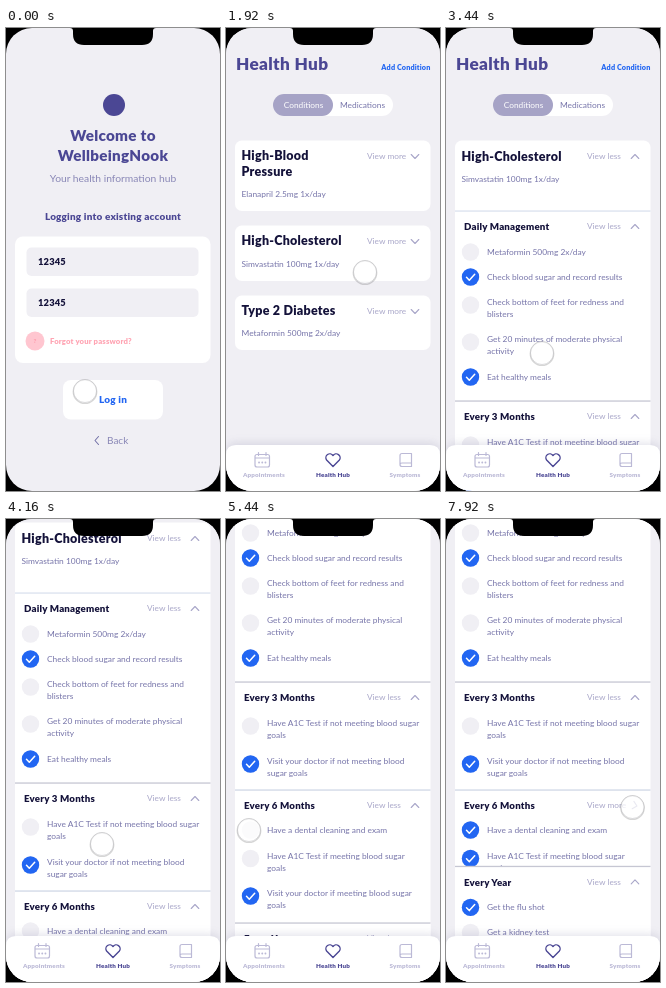
An HTML page that plays this animation: 214 px wide and 463 px high, repeating every 8 s.

```html
<!DOCTYPE html>
<html lang="en">
<head>
<meta charset="utf-8">
<title>Health app walkthrough</title>
<style>
  html, body { margin: 0; width: 100%; height: 100%; overflow: hidden; background: #000; }
  svg { display: block; width: 214px; height: 463px; border-radius: 26px; background: #f0eff4; }
  text { font-family: Lato, "Open Sans", sans-serif; }
  .heavy { font-weight: 900; letter-spacing: .02em; }
</style>
</head>
<body>
<svg id="stage" viewBox="0 0 214 463"></svg>
<script>
const LOOP = 8000, STEP = 80;
const INK = '#14123a', PURPLE = '#4b4794', BODY = '#7674a9', SOFT = '#a9a7c9',
      GREY = '#f0eff4', BLUE = '#2266f2';
const stage = document.getElementById('stage');

// ---- drawing helpers ----
function add(parent, tag, attrs = {}) {
  const node = document.createElementNS('http://www.w3.org/2000/svg', tag);
  for (const key in attrs) node.setAttribute(key, attrs[key]);
  return parent.appendChild(node);
}
const group = (parent, x = 0, y = 0) => add(parent, 'g', { transform: `translate(${x} ${y})` });
const box = (parent, x, y, width, height, rx, fill = '#fff') =>
  add(parent, 'rect', { x, y, width, height, rx, fill });
const line = (parent, d, stroke, width = 1.1) => add(parent, 'path', {
  d, stroke, 'stroke-width': width, fill: 'none', 'stroke-linecap': 'round', 'stroke-linejoin': 'round' });

// y is the middle of the capitals
function label(parent, x, y, string, size = 8.4, fill = BODY, anchor = 'start') {
  const node = add(parent, 'text', {
    x, y: y + size * 0.36, fill, 'font-size': size, 'text-anchor': anchor });
  node.textContent = string;
  return node;
}
function bold(parent, x, y, string, size, fill = INK, anchor) {
  label(parent, x, y, string, size, fill, anchor).setAttribute('class', 'heavy');
}

function viewToggle(parent, y, open) {
  const caption = label(parent, 141, y, open ? 'View less' : 'View more', 8.3, SOFT);
  const holder = group(parent, 189, y);
  const chevron = line(holder, 'M-3.8 2 L0 -2 L3.8 2', SOFT);
  if (!open) chevron.setAttribute('transform', 'rotate(180)');
  return { caption, chevron };
}

function tick(parent, y) {
  const mark = group(parent, 24.5, y);
  add(mark, 'circle', { r: 8.7, fill: BLUE });
  line(mark, 'M-4 0.3 L-1.2 3.2 L4.2 -2.8', '#fff', 1.5);
  return mark;
}

function task(parent, y, lines, checked) {
  const circleY = y + (lines.length > 1 ? 3 : 0);
  add(parent, 'circle', { cx: 24.5, cy: circleY, r: 8.7, fill: GREY });
  lines.forEach((string, i) => label(parent, 41, y + i * 12.3, string));
  const mark = tick(parent, circleY);
  mark.setAttribute('opacity', checked ? 1 : 0);
  return mark;
}

function section(parent, top, title, dividerColor) {
  box(parent, 9, top - 0.6, 195.5, 1.3, 0, dividerColor);
  bold(parent, 18, top + 16, title, 9.7);
  return viewToggle(parent, top + 15.5, true);
}

function hubHeader(parent) {
  bold(parent, 10, 36, 'Health Hub', 17.2, PURPLE);
  bold(parent, 204.5, 39.5, 'Add Condition', 7.25, BLUE, 'end');
  box(parent, 47, 66, 120, 22, 11);
  box(parent, 47, 66, 60, 22, 11, '#a6a3c6');
  label(parent, 77.5, 77, 'Conditions', 8.3, '#fff', 'middle');
  label(parent, 136.5, 77, 'Medications', 8.4, BODY, 'middle');
}

// ---- log-in screen ----
const login = group(stage);
add(login, 'circle', { cx: 108, cy: 77, r: 11, fill: PURPLE });
bold(login, 107, 108, 'Welcome to', 15.2, PURPLE, 'middle');
bold(login, 107, 127.5, 'WellbeingNook', 15.2, PURPLE, 'middle');
label(login, 107, 150, 'Your health information hub', 10.3, '#8987b6', 'middle');
bold(login, 107, 188.5, 'Logging into existing account', 9.95, PURPLE, 'middle');
box(login, 9, 208.5, 195.5, 126.5, 8);
for (const y of [219.5, 260.5]) {
  box(login, 20.5, y, 172, 28.5, 5, GREY);
  bold(login, 32, y + 14, '12345', 9.3);
}
add(login, 'circle', { cx: 29, cy: 313, r: 9.5, fill: '#ffc6d0' });
bold(login, 29, 313, '?', 6, '#ff9fae', 'middle');
bold(login, 44, 313, 'Forgot your password?', 7.7, '#ffa4b3');
box(login, 57, 352, 100, 39.5, 8);
bold(login, 107, 371, 'Log in', 10, BLUE, 'middle');
line(login, 'M92.5 408.5 L89 412.5 L92.5 416.5', BODY);
label(login, 101, 412.5, 'Back', 10, '#8987b6');

// ---- hub: condition list and opened condition ----
const hub = group(stage);
add(hub, 'rect', { width: 214, height: 463, fill: GREY });
const page = group(hub);
hubHeader(page);

const list = group(page);
function conditionCard(top, height, titles, dose) {
  box(list, 9, top, 195.5, height, 7);
  titles.forEach((title, i) => bold(list, 15.5, top + 15 + i * 15.5, title, 12.5));
  label(list, 15.5, top + height - 17, dose);
  viewToggle(list, top + 16, false);
}
conditionCard(112.5, 70.5, ['High-Blood', 'Pressure'], 'Elanapril 2.5mg 1x/day');
conditionCard(197.5, 55.5, ['High-Cholesterol'], 'Simvastatin 100mg 1x/day');
conditionCard(267.5, 54.5, ['Type 2 Diabetes'], 'Metaformin 500mg 2x/day');

const detail = group(page);
box(detail, 9, 112.5, 195.5, 700, 7);
bold(detail, 15.5, 128, 'High-Cholesterol', 12.5);
label(detail, 15.5, 151, 'Simvastatin 100mg 1x/day');
viewToggle(detail, 128.5, true);

section(detail, 183, 'Daily Management', '#dbe2ee');
task(detail, 224, ['Metaformin 500mg 2x/day']);
task(detail, 249, ['Check blood sugar and record results'], true);
task(detail, 274, ['Check bottom of feet for redness and', 'blisters']);
task(detail, 311, ['Get 20 minutes of moderate physical', 'activity']);
task(detail, 349, ['Eat healthy meals'], true);

section(detail, 373, 'Every 3 Months', '#c6c7d3');
task(detail, 414, ['Have A1C Test if not meeting blood sugar', 'goals']);
task(detail, 452, ['Visit your doctor if not meeting blood', 'sugar goals'], true);

const sixMonths = section(detail, 481, 'Every 6 Months', '#d0d8e6');
const dentalTick = task(detail, 521, ['Have a dental cleaning and exam']);
const testTick = task(detail, 546.5, ['Have A1C Test if meeting blood sugar', 'goals']);
task(detail, 584, ['Visit your doctor if meeting blood sugar', 'goals'], true);

const year = group(detail);
box(year, 9, 614, 195.5, 200, 0);
section(year, 614, 'Every Year', '#c6c7d3');
task(year, 655, ['Get the flu shot'], true);
task(year, 680, ['Get a kidney test']);

// ---- tab bar ----
const tabs = group(hub);
add(tabs, 'path', { d: 'M0 463 V427 Q0 417 10 417 H204 Q214 417 214 427 V463 Z', fill: '#fff',
  style: 'filter: drop-shadow(0 -2px 4px rgba(80,80,130,.16))' });
const TAB_OFF = '#bbb9d6';
line(tabs, 'M31 426.5 H41.5 Q43.5 426.5 43.5 428.5 V437 Q43.5 439 41.5 439 H31 Q29 439 29 437 V428.5 Q29 426.5 31 426.5 Z M32.5 424.5 V427.5 M40 424.5 V427.5 M29.5 430 H43', TAB_OFF, 1.2);
line(tabs, 'M33 434.5 h.1 M36.2 434.5 h.1 M39.4 434.5 h.1', TAB_OFF, 1.8);
line(tabs, 'M107 438.5 L100.6 432 A3.9 3.9 0 0 1 107 427.5 A3.9 3.9 0 0 1 113.4 432 Z', PURPLE, 1.4);
line(tabs, 'M185.5 435 V425.5 H176 Q174 425.5 174 427.5 V436.5 Q174 438.5 176 438.5 H185.5 V435 H176 Q174 435 174 436.8', TAB_OFF, 1.2);
bold(tabs, 38, 446.3, 'Appointments', 6.3, TAB_OFF, 'middle');
bold(tabs, 107, 446.3, 'Health Hub', 6.3, PURPLE, 'middle');
bold(tabs, 179, 446.3, 'Symptoms', 6.3, TAB_OFF, 'middle');

// ---- pointer and notch ----
const pointer = group(stage);
add(pointer, 'circle', { cy: 0.7, r: 11.7, fill: 'none', stroke: 'rgba(0,0,0,.16)', 'stroke-width': 1.4 });
add(pointer, 'circle', { r: 11.5, fill: 'rgba(255,255,255,.75)',
  stroke: 'rgba(120,120,130,.35)', 'stroke-width': 0.7 });
add(stage, 'path', { d: 'M64 0 Q67 0 67 3 V6 Q67 17 78 17 H136 Q147 17 147 6 V3 Q147 0 150 0 Z' });

// ---- motion ----
const ease = p => p * p * (3 - 2 * p);
const progress = (t, start, length) => Math.min(1, Math.max(0, (t - start) / length));

// keys: [time, ...values]
function track(keys, t, curve) {
  let i = 0;
  while (i < keys.length - 2 && t >= keys[i + 1][0]) i++;
  const [from, to] = [keys[i], keys[i + 1]];
  const p = curve(progress(t, from[0], to[0] - from[0]));
  return from.slice(1).map((value, k) => value + (to[k + 1] - value) * p);
}

const POINTER = [
  [0, 79, 363], [320, 94, 370], [1120, 96, 368], [1920, 139, 244], [2240, 170, 216],
  [2560, 170, 216], [3120, 104, 321], [3440, 96, 325], [4560, 96, 325], [5280, 23, 311],
  [5840, 23, 311], [6160, 27, 340], [6400, 27, 340], [7040, 174, 294], [7600, 186.5, 288], [8000, 186.5, 288]];
const SCROLL = [[3440, 0], [3680, 22], [4160, 109], [4480, 191], [4640, 206], [4800, 210]];

function move(node, y) { node.setAttribute('transform', `translate(0 ${y})`); }
function fade(node, opacity) { node.setAttribute('opacity', opacity); }

function draw(t) {
  fade(hub, ease(progress(t, 720, 400)));

  const open = ease(progress(t, 2320, 360));
  fade(list, 1 - open);
  move(list, -84.5 * open);
  fade(detail, open);
  move(detail, 84.5 * (1 - open));
  move(page, -track(SCROLL, t, p => p)[0]);

  fade(dentalTick, t >= 5600 ? 1 : 0);
  fade(testTick, t >= 6240 ? 1 : 0);

  const fold = ease(progress(t, 7720, 365));
  move(year, -99 * fold);
  sixMonths.chevron.setAttribute('transform', `rotate(${180 * fold})`);
  sixMonths.caption.textContent = fold > 0 ? 'View more' : 'View less';

  const [x, y] = track(POINTER, t, ease);
  pointer.setAttribute('transform', `translate(${x} ${y})`);
}

const began = performance.now();
function animate() {
  const t = (performance.now() - began) % LOOP;
  draw(Math.floor(t / STEP) * STEP);
  requestAnimationFrame(animate);
}
animate();
</script>
</body>
</html>
```
